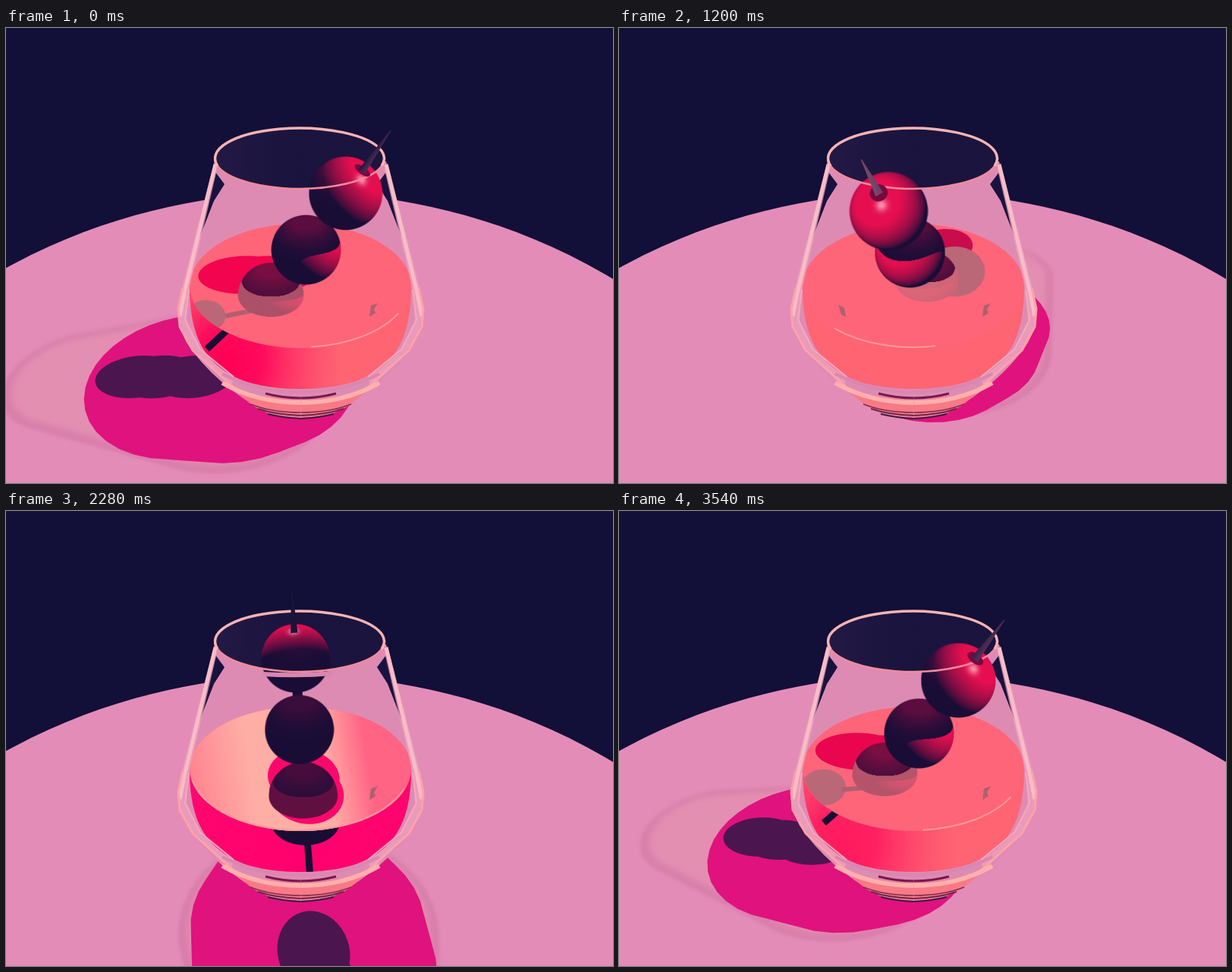
These frames come from a looping animation (800x600 px, 3.57 s). An HTML page with a canvas:

```html
<!DOCTYPE html>
<html>
<head>
<meta charset="utf-8">
<style>
html, body { margin: 0; width: 100%; height: 100%; overflow: hidden; background: #120f38; }
canvas { display: block; }
</style>
</head>
<body>
<canvas id="stage" width="800" height="600"></canvas>
<script>
const ctx = document.getElementById('stage').getContext('2d');
const LOOP = 3570, STEP = 30, MID = 388.5;
const NAVY = '#120f38', TABLE = '#e48cb8', PLUM = '#4b1650', WATER = 2.78;
// Cherries sit in the plane of the pick: u = distance from the axis, y = height.
const cherries = [{u: .91, y: 4.92, r: .74}, {u: .13, y: 3.61, r: .745}, {u: -.65, y: 2.42, r: .74}];
const sprite = document.createElement('canvas');
sprite.width = sprite.height = 100;
const spriteCtx = sprite.getContext('2d');
let cos = 1, sin = 0;

const clamp = v => Math.max(0, Math.min(1, v));
const mix = (a, b, k) => a.map((v, i) => v + (b[i] - v) * k);

function project(x, y, z) {
  const dy = y - 9.55, dz = 10 - z, depth = .854 * dz - .5195 * dy, scale = 724 / depth;
  return [MID - 1 + x * scale, 300 - (.5195 * dz + .854 * dy) * scale, scale];
}
// u runs along the light and pick direction, w across it
const at = (u, y, w = 0) => project(u * cos - w * sin, y, -u * sin - w * cos);

function addRing(path, u, y, ru, rw = ru) {
  for (let i = 0; i < 40; i++) {
    const a = i * Math.PI / 20, [px, py] = at(u + ru * Math.cos(a), y, rw * Math.sin(a));
    i ? path.lineTo(px, py) : path.moveTo(px, py);
  }
  path.closePath();
}

function fill(path, color) { ctx.fillStyle = color; ctx.fill(path); }
function stroke(path, color, width) {
  ctx.strokeStyle = color; ctx.lineWidth = width; ctx.stroke(path);
}
function clipped(path, draw, rule) {
  ctx.save(); ctx.clip(path, rule); draw(); ctx.restore();
}
function mirrored(draw) {
  draw();
  ctx.save(); ctx.translate(2 * MID, 0); ctx.scale(-1, 1); draw(); ctx.restore();
}
function ellipse(x, y, rx, ry) {
  const p = new Path2D(); p.ellipse(x, y, rx, ry, 0, 0, 7); return p;
}

const surface = ellipse(388, 340, 146, 82);
const rim = ellipse(387, 172, 112, 40.5);
const liquid = new Path2D('M242 340C242 412 264 476 388 476S534 412 534 340Z');
const glass = new Path2D('M275 176L232 345Q222 385 238 415Q275 470 345 508Q388 520 432 508Q502 470 539 415Q555 385 545 345L501 176Z');
const belowSurface = new Path2D('M0 340H800V600H0Z');
belowSurface.addPath(surface);

// Shadow on the table of a solid given as [height, radius] points
function solidShadow(profile, inset = 0) {
  const path = new Path2D();
  for (let i = 1; i < profile.length; i++) {
    for (let k = 0; k <= 1; k += .05) {
      const [y, r] = mix(profile[i - 1], profile[i], k);
      addRing(path, -y, 0, r - inset);
    }
  }
  return path;
}
// Under water the light runs steeper
function cherryShadow(height) {
  const path = new Path2D();
  for (const {u, y, r} of cherries) {
    const shift = (y - height) * (y < WATER ? .82 : 1);
    if (shift > 0) addRing(path, u - shift, height, r * 1.35, r);
  }
  return path;
}

function drawTable() {
  ctx.fillStyle = NAVY;
  ctx.fillRect(0, 0, 800, 600);
  const top = new Path2D();
  for (let i = 0; i < 100; i++) {
    const a = i * Math.PI / 50, [x, y] = project(10.68 * Math.cos(a), 0, 10.68 * Math.sin(a));
    top.lineTo(x, y);
  }
  fill(top, TABLE);
  const outer = [[0, 1.31], [1.74, 2.8], [5.65, 1.65]];
  clipped(top, () => {
    ctx.filter = 'blur(2px)';
    fill(solidShadow(outer), '#d97eab');
    ctx.filter = 'blur(5px)';
    fill(solidShadow(outer, .2), '#e38fb1');
    ctx.filter = 'none';
    fill(solidShadow([[0, 1.31], [.9, 2.25], [1.6, 2.55], [WATER, 2.45]]), '#e0127d');
    fill(cherryShadow(0), PLUM);
  });
}

function drawGlassBack() {
  fill(glass, '#de8bb4');
  mirrored(() => fill(new Path2D('M276 190L288 206L274 228L253 282Z'), '#19123f'));
  const g = ctx.createLinearGradient(275, 0, 500, 0);
  g.addColorStop(0, '#221945'); g.addColorStop(.5, '#19133d'); g.addColorStop(1, '#1b143f');
  fill(rim, g);
}

function drawLiquid() {
  const back = clamp((sin - .3) / .6), front = clamp(sin);
  fill(liquid, '#ff6473');
  const hot = ctx.createRadialGradient(388 - 95 * cos, 440, 0, 388 - 95 * cos, 440, 150 + 190 * front);
  hot.addColorStop(0, `rgba(255,0,${84 + 26 * front},1)`);
  hot.addColorStop(.3 + .5 * front, `rgba(255,0,${90 + 20 * front},.9)`);
  hot.addColorStop(1, 'rgba(255,50,100,0)');
  ctx.globalAlpha = clamp(1 + 1.2 * sin);
  fill(liquid, hot);
  ctx.globalAlpha = 1;

  clipped(liquid, () => clipped(belowSurface, () => {
    const bowl = at(-.65, 1.7), a = at(-1.05, 1.7), b = at(-1.6, .86);
    const spread = x => MID + (x - MID) * 1.38;
    fill(ellipse(bowl[0] + 3, bowl[1], 45, 30), '#1a0d34');
    const stub = new Path2D();
    stub.moveTo(spread(a[0]), a[1]); stub.lineTo(spread(b[0]), b[1]);
    stroke(stub, '#1a0d34', 9);
  }, 'evenodd'));

  const sheen = ctx.createLinearGradient(245, 350, 500, 310);
  sheen.addColorStop(0, '#ff8590'); sheen.addColorStop(.3, '#ffaea6');
  sheen.addColorStop(.68, '#ffaea6'); sheen.addColorStop(.9, '#ff6485');
  fill(surface, '#ff6579');
  ctx.globalAlpha = back;
  fill(surface, sheen);
  ctx.globalAlpha = 1;
  clipped(surface, () => {
    ctx.save();
    ctx.translate(0, -11);
    const tint = mix(mix([243, 4, 79], [252, 8, 108], back), [196, 13, 76], clamp(-sin));
    fill(cherryShadow(WATER), `rgb(${tint})`);
    ctx.restore();
    ctx.globalAlpha = 1 - back;
    const [x, y] = at(-2.15, 1.85), a = at(-.9, 2.05), b = at(-1.7, 1.85);
    const grow = clamp(-sin);
    fill(ellipse(x, y, 26 + 16 * grow, 21 + 14 * grow), '#ba6877');
    const stem = new Path2D();
    stem.moveTo(a[0], a[1]); stem.lineTo(b[0], b[1]);
    stroke(stem, '#b05f70', 6);
    ctx.globalAlpha = 1;
    if (cos > -.8) fill(new Path2D('M481 366L490 363L485 371L487 376L479 381Z'), '#ad6070');
    if (cos < -.3) fill(new Path2D('M289 365L297 369L299 381L293 378Z'), '#ad6070');
  });
  const edge = new Path2D(), mid = Math.PI / 2 - .6 * cos, half = .5 + .8 * back;
  edge.ellipse(388, 339, 145, 82, 0, mid - half, mid + half);
  stroke(edge, '#ff9a98', 2);
}

function paintCherry(cherry, light, centers) {
  const img = spriteCtx.createImageData(100, 100);
  const me = centers.get(cherry), wet = cherry.y < WATER;
  const haze = .66 - .36 * clamp(sin) + .26 * clamp(-sin);
  const half = [light[0], light[1] + .5195, light[2] + .854], len = Math.hypot(...half);
  const dot = (a, b) => a[0] * b[0] + a[1] * b[1] + a[2] * b[2];
  for (let j = 0; j < 100; j++) for (let i = 0; i < 100; i++) {
    const x = (i - 49.5) / 50;
    let y = (49.5 - j) / 50;
    if (wet && y < 0) y *= 1.55;
    const rho = Math.hypot(x, y);
    if (rho >= 1) continue;
    const z = Math.sqrt(1 - rho * rho);
    const n = [x, .854 * y + .5195 * z, -.5195 * y + .854 * z];
    const p = me.map((v, k) => v + n[k] * cherry.r);
    let lit = clamp(dot(n, light) * 1.25);
    for (const other of cherries) {
      if (other === cherry) continue;
      const d = centers.get(other).map((v, k) => v - p[k]), along = dot(d, light);
      if (along > 0 && dot(d, d) - along * along < other.r ** 2) lit = 0;
    }
    const glow = .32 * clamp(n[1] * 1.1) ** 3 * (1 - .5 * clamp(sin));
    const base = wet ? mix([25, 13, 54], [100, 14, 64], .6 - .4 * clamp(sin)) : [25, 13, 54];
    let color = mix(base, [228, 14, 80], Math.max(lit ** .8, glow));
    if (lit) color = mix(color, [255, 170, 190], .85 * clamp(dot(n, half) / len) ** 90);
    if (p[1] < WATER) color = mix(color, sin > .5 ? [225, 20, 85] : [224, 112, 126], haze);
    img.data.set([...color, 255 * clamp((1 - rho) * 45)], (j * 100 + i) * 4);
  }
  spriteCtx.putImageData(img, 0, 0);
  const [x, y, scale] = at(cherry.u, cherry.y), r = cherry.r * scale;
  ctx.drawImage(sprite, x - r, y - r, 2 * r, 2 * r);
}

function drawCherries() {
  const light = [cos, 1, -sin].map(v => v * Math.SQRT1_2);
  const centers = new Map(cherries.map(c => [c, [c.u * cos, c.y, -c.u * sin]]));
  const a = at(.91, 4.92), b = at(-.65, 2.42), stick = new Path2D();
  stick.moveTo(a[0], a[1]); stick.lineTo(b[0], b[1]);
  stroke(stick, '#1c0e36', 13);
  for (const cherry of [...cherries].reverse()) paintCherry(cherry, light, centers);
  if (sin > .8) {
    const gap = new Path2D('M338 215Q387 218 430 214');
    stroke(gap, '#d886b0', 6 * clamp((sin - .8) * 6));
  }
}

function drawPick() {
  const [bx, by, scale] = at(1.2, 5.38), [tx, ty] = at(1.7, 6.21);
  const len = Math.hypot(tx - bx, ty - by), w = .075 * scale;
  const nx = (by - ty) / len * w, ny = (tx - bx) / len * w;
  const near = clamp(-sin), shade = ctx.createLinearGradient(bx - nx, by - ny, bx + nx, by + ny);
  const tone = (c, k) => `rgb(${mix(c, [150, 92, 120], k * near)})`;
  if (sin < .5) {
    ctx.save();
    ctx.translate(bx, by);
    ctx.rotate(Math.atan2(ty - by, tx - bx) + Math.PI / 2);
    fill(ellipse(0, -2, 12, 5 + 7 * near), '#78083e');
    ctx.restore();
  }
  shade.addColorStop(0, tone([34, 20, 60], .9));
  shade.addColorStop(1, tone([80, 48, 88], .4));
  const cone = new Path2D();
  cone.moveTo(bx - nx, by - ny); cone.lineTo(tx - nx * .12, ty - ny * .12);
  cone.lineTo(tx + nx * .12, ty + ny * .12); cone.lineTo(bx + nx, by + ny);
  fill(cone, sin > .8 ? '#1c1238' : shade);
}

function drawGlassFront() {
  mirrored(() => {
    fill(new Path2D('M274 178L278 187L241 345L238 385L258 428L300 462L296 474L244 420Q222 390 230 350Z'), 'rgba(236,160,190,.75)');
    stroke(new Path2D('M276 180L236 345L229 380'), '#f8bdc6', 5);
    stroke(new Path2D('M241 345L236 385L256 424L300 460'), '#f5a9b8', 2);
    stroke(new Path2D('M233 343L227 370L229 394L246 425L300 474L345 500'), '#ffa2a8', 3);
    fill(new Path2D('M305 481L388.5 492V513Q350 512 325 498Z'), '#f97986');
    stroke(new Path2D('M285 456Q330 480 388.5 480'), '#d987b0', 4);
    stroke(new Path2D('M342 482Q365 488 388.5 488'), '#7c174e', 3);
    stroke(new Path2D('M285 468Q330 494 388.5 494'), '#ffb0ac', 6);
    stroke(new Path2D('M322 496Q350 507 388.5 507'), '#7b2d50', 1.5);
    stroke(new Path2D('M332 502Q355 510 388.5 511'), '#6b2748', 2);
    stroke(new Path2D('M345 509Q365 514 388.5 515'), '#40183d', 2);
  });
  const frontRim = new Path2D(), backRim = new Path2D();
  frontRim.ellipse(387, 172, 111.5, 40, 0, .2, Math.PI - .2);
  backRim.ellipse(387, 172, 111.5, 40, 0, Math.PI - .25, 2 * Math.PI + .25);
  stroke(frontRim, '#f08b9c', 2.5);
  stroke(backRim, '#f9b3b2', 3.5);
}

function frame(now) {
  const angle = Math.floor(now % LOOP / STEP) * Math.PI / 30;
  cos = Math.cos(angle);
  sin = Math.sin(angle);
  drawTable();
  drawGlassBack();
  drawLiquid();
  drawCherries();
  drawGlassFront();
  drawPick();
}

const start = performance.now();
function tick() {
  frame(performance.now() - start);
  requestAnimationFrame(tick);
}
tick();
</script>
</body>
</html>
```
